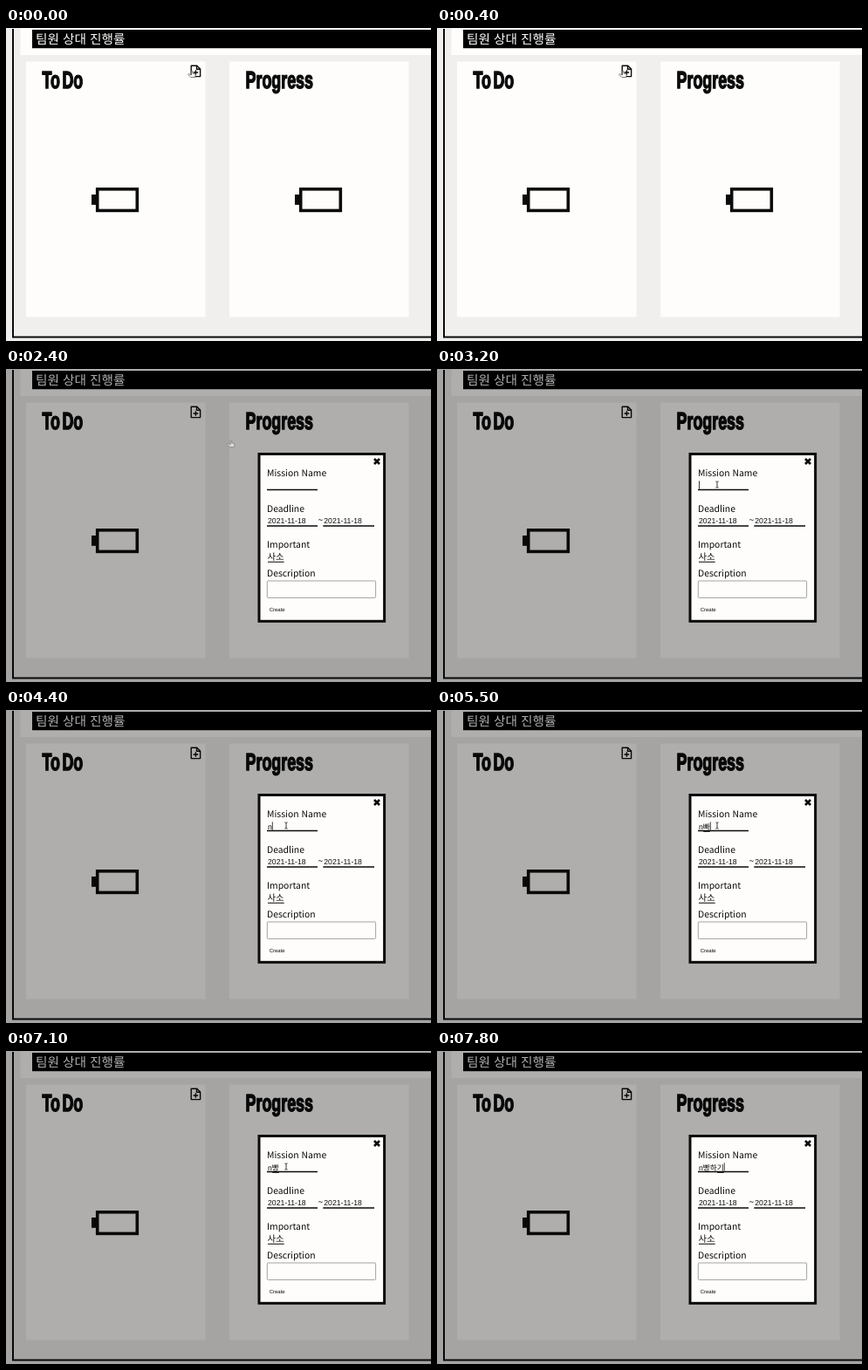
Write an HTML page that moves like this. It is 487 by 359 pixels and loops after 8 s.

```html
<!DOCTYPE html>
<html lang="ko">
<head>
<meta charset="utf-8">
<title>Mission board</title>
<style>
  html, body { margin: 0; width: 100%; height: 100%; overflow: hidden; background: #f0efed; }
  svg { display: block; width: 487px; height: 359px; }
  text { fill: #0b0b0b; text-rendering: geometricPrecision; }
  .kr { font-family: "Noto Sans CJK KR", "Noto Sans CJK", "Noto Sans", sans-serif; }
  .label { font-size: 10.4px; }
  .field { font: 8.67px "Liberation Sans", "Noto Sans CJK KR", "Noto Sans CJK", sans-serif; }
  .head {
    font: bold 27.5px "Liberation Sans", sans-serif; word-spacing: -4px;
    stroke: #0b0b0b; stroke-width: 1.5;
  }
  .paper { fill: #fefdfb; }
  .line { stroke: #0b0b0b; fill: none; }
</style>
</head>
<body>
<svg viewBox="0 0 487 359">
  <defs>
    <g id="battery">
      <rect class="line" x="104.7" y="184.8" width="45.6" height="24.6" stroke-width="3.6"/>
      <rect x="98" y="191" width="6" height="11.8" fill="#0b0b0b"/>
    </g>
  </defs>

  <rect width="487" height="359" fill="#f0efed"/>
  <rect class="paper" x="16.5" y="0" width="471" height="31"/>
  <rect x="30" y="2" width="457" height="21.2"/>
  <text class="kr" x="34" y="18.3" font-size="14.65" style="fill:#fefdfb">팀원 상대 진행률</text>
  <path class="line" d="M8 1V354.6H487" stroke-width="2"/>
  <rect class="paper" x="23" y="38.5" width="205.5" height="293"/>
  <rect class="paper" x="256" y="38.5" width="205.5" height="293"/>
  <text class="head" transform="translate(41.5 69.4) scale(.65 1)">To Do</text>
  <text class="head" transform="translate(274.5 69.4) scale(.65 1)">Progress</text>
  <use href="#battery"/>
  <use href="#battery" x="233"/>
  <g class="line" stroke-width="1.4" stroke-linejoin="round">
    <path d="M212.2 43.2H218.8L222.6 47V55.6H212.2Z"/>
    <path d="M218.5 43.2V47.2H222.6M217.4 48.2V53.8M214.6 51H220.2"/>
  </g>

  <g id="dialog">
    <rect width="487" height="359" fill="#000" fill-opacity=".315"/>
    <rect x="290" y="97.5" width="143.6" height="191.8" fill="#fefdfb" stroke="#0b0b0b" stroke-width="3"/>
    <path class="line" d="M422 103L428 109M428 103L422 109" stroke-width="2.7"/>
    <g class="kr label">
      <text x="299" y="123.2">Mission Name</text>
      <text x="299" y="164">Deadline</text>
      <text x="299" y="204.8">Important</text>
      <text x="299.5" y="219">사소</text>
      <text x="299" y="238.2">Description</text>
      <text x="357.6" y="177">~</text>
    </g>
    <path class="line" d="M299 138.5H357M299 180H357M363.3 180H422" stroke-width="1.4"/>
    <path class="line" d="M300 221.3H318.7" stroke-width="1"/>
    <text class="field" x="300" y="176.6">2021-11-18</text>
    <text class="field" x="364.3" y="176.6">2021-11-18</text>
    <rect x="299.3" y="243" width="124.3" height="19.4" rx="1" fill="#fefdfb" stroke="#8c8c8c" stroke-width=".8"/>
    <text x="301.7" y="278.2" font-family="Liberation Sans, sans-serif" font-size="6">Create</text>
    <text id="typed" class="field" x="300" y="136.6"></text>
    <path id="compose" class="line" stroke-width=".8"/>
    <path id="caret" class="line" stroke-width=".8"/>
  </g>

  <g id="hand">
    <path d="M-1.6 -4.5V0L-4.6 -1.4L-5.2 -.4L-2.2 2.6H2.6L3.2 -1L-.2 -2V-4.5Z"
      fill="#fefdfb" stroke="#555" stroke-width=".7"/>
  </g>
  <path id="ibeam" class="line" d="M-1.6 -3.6Q0 -3.6 0 -2.8Q0 -3.6 1.6 -3.6M0 -2.8V2.8M-1.6 3.6Q0 3.6 0 2.8Q0 3.6 1.6 3.6" stroke-width=".8"/>
</svg>
<script>
const LOOP = 8000;
const OPEN = 1400;
const MOVE = { start: 2000, end: 2900, from: [214, 54], to: [321, 132.5] };
const HIDE_POINTER = 7200;

// [time, value] keys, each held until the next one
const TYPING = [[0, ""], [4400, "n"], [5500, "n빠"], [5700, "n빵"], [7200, "n빵ㅎ"],
  [7300, "n빵하"], [7700, "n빵학"], [7800, "n빵하기"]];
const CARET = [[0, false], [3200, true], [3800, false], [4400, true], [5000, false],
  [5500, true], [6300, false], [7200, true]];

const $ = id => document.getElementById(id);
const held = (keys, t) => keys.filter(([at]) => at <= t).pop()[1];
const show = (id, on) => $(id).setAttribute("visibility", on ? "visible" : "hidden");
const widthOf = text => [...text].reduce((w, c) => w + (c < "\u0080" ? 4.82 : 7.98), 0);

function drawPointer(t) {
  const p = Math.min(1, Math.max(0, (t - MOVE.start) / (MOVE.end - MOVE.start)));
  const eased = p * p * (3 - 2 * p);
  const [x, y] = MOVE.from.map((a, i) => a + (MOVE.to[i] - a) * eased);
  const overField = x > 299 && x < 357 && y > 126 && y < 139;
  for (const id of ["hand", "ibeam"]) $(id).setAttribute("transform", `translate(${x} ${y})`);
  $("hand").setAttribute("opacity", t < OPEN ? 1 : 0.6);
  show("hand", !overField);
  show("ibeam", overField && t < HIDE_POINTER);
}

function drawInput(t) {
  const text = held(TYPING, t);
  const end = 300 + widthOf(text);
  $("typed").textContent = text;
  $("caret").setAttribute("d", `M${end + 0.5} 128.3V137.7`);
  $("caret").setAttribute("stroke-opacity", held(CARET, t) ? 1 : 0);
  $("compose").setAttribute("d", text.length > 1 ? `M${end - 7.6} 139.5H${end}` : "");
}

function render(t) {
  $("dialog").setAttribute("display", t < OPEN ? "none" : "inline");
  drawPointer(t);
  drawInput(t);
}

const begin = performance.now();
function tick() {
  render((performance.now() - begin) % LOOP);
  requestAnimationFrame(tick);
}
tick();
</script>
</body>
</html>
```
